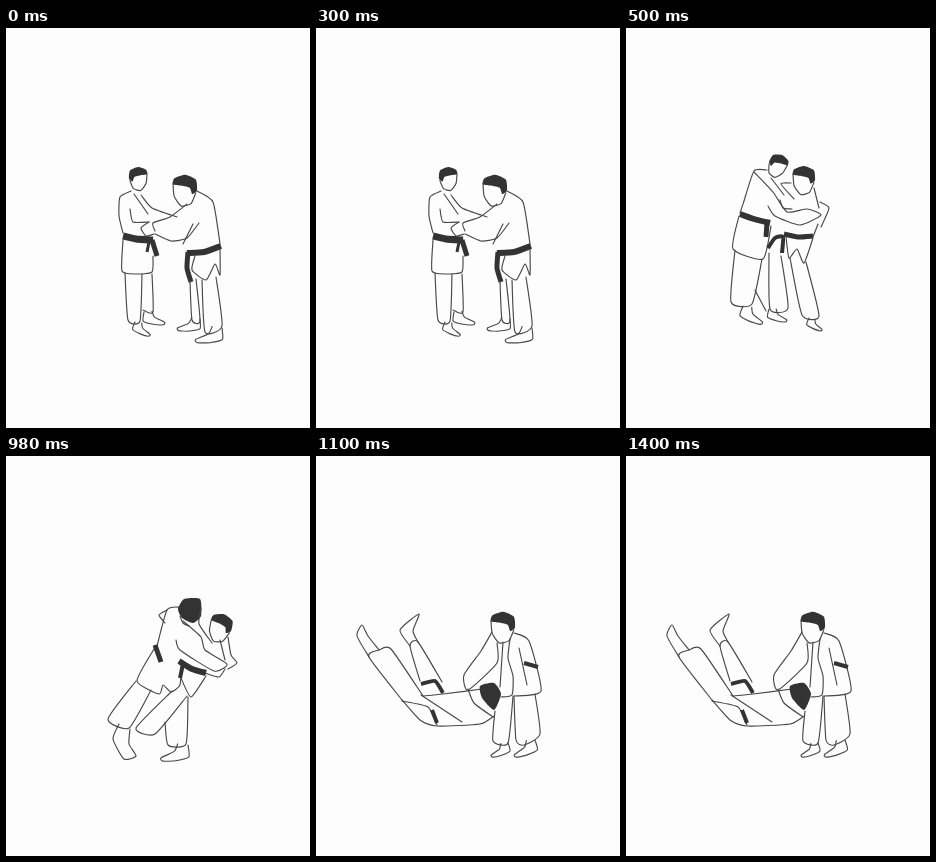
Animation of 304x400 px, one loop 1600 ms. Source, as an HTML page with a canvas:

```html
<!DOCTYPE html>
<html lang="en">
<head>
<meta charset="utf-8">
<title>Judo throw</title>
<style>
html, body { margin: 0; width: 100%; height: 100%; overflow: hidden; background: #fdfdfd; }
canvas { display: block; width: 100%; height: 100%; }
</style>
</head>
<body>
<canvas width="304" height="400"></canvas>
<script>
const ctx = document.querySelector('canvas').getContext('2d');
const INK = '#484848', DARK = '#333', LOOP = 1600;

// Slightly rounded path through the given x, y pairs.
function curve(p, closed) {
  const n = p.length / 2;
  const at = i => {
    const k = closed ? (i + n) % n : Math.max(0, Math.min(n - 1, i));
    return [p[2 * k], p[2 * k + 1]];
  };
  ctx.beginPath();
  ctx.moveTo(...at(0));
  for (let i = 0; i < (closed ? n : n - 1); i++) {
    const [a, b, c, d] = [at(i - 1), at(i), at(i + 1), at(i + 2)];
    ctx.bezierCurveTo(b[0] + (c[0] - a[0]) / 10, b[1] + (c[1] - a[1]) / 10,
      c[0] - (d[0] - b[0]) / 10, c[1] - (d[1] - b[1]) / 10, ...c);
  }
}

function stroke(color, width) {
  ctx.strokeStyle = color;
  ctx.lineWidth = width;
  ctx.stroke();
}

function line(...points) {
  curve(points);
  stroke(INK, 1.15);
}

function belt(width, ...points) {
  curve(points);
  ctx.lineCap = 'butt';
  stroke(DARK, width);
  ctx.lineCap = 'round';
}

function hair(...points) {
  curve(points, true);
  ctx.fillStyle = DARK;
  ctx.fill();
}

// Runs a drawing in its own scaled and turned space; a negative size faces left.
function place(x, y, size, tilt, drawing) {
  ctx.save();
  ctx.translate(x, y);
  ctx.rotate(tilt * Math.PI / 180);
  ctx.scale(size, Math.abs(size));
  drawing();
  ctx.restore();
  stroke(INK, 1.15);
}

function head(x, y, size, tilt = 0) {
  place(x, y, size, tilt, () => {
    hair(-1, .2, -.9, -.7, 0, -1.1, .9, -.8, 1, -.3, .3, -.2, -.4, 0, -.6, .5);
    curve([1, -.4, .9, .7, .3, 1.5, -.5, 1.3, -.9, .4]);
  });
}

function foot(x, y, size, tilt = 0) {
  place(x, y, size, tilt, () => curve([0, 0, -.08, .45, .4, .65, .9, .72, .98, .6, .5, .3, .4, 0]));
}

function grip() {
  head(132, 149, 9);
  line(125, 163, 114, 169, 113, 188, 117, 205);
  line(135, 167, 146, 180, 171, 189);
  line(128, 166, 142, 186);
  line(124, 181, 127, 194, 143, 194);
  belt(7, 117, 208, 130, 211, 147, 212);
  belt(5, 146, 212, 151, 228);
  belt(3, 143, 214, 141, 224);
  line(117, 212, 116, 243, 130, 246, 146, 244, 147, 228);
  line(119, 245, 122, 292, 134, 293, 136, 246);
  line(146, 246, 147, 284, 137, 282);
  foot(129, 294, 17, 8);
  foot(138, 284, 20, -5);

  head(179, 160, -12);
  line(191, 163, 207, 174, 214, 216);
  line(181, 176, 164, 189, 147, 195, 149, 203);
  line(143, 194, 135, 200, 140, 208, 148, 206);
  line(149, 206, 165, 213, 181, 210, 193, 195);
  line(187, 196, 177, 216);
  belt(6, 181, 225, 198, 224, 215, 218);
  belt(5, 182, 224, 181, 240, 185, 254);
  line(189, 228, 186, 242, 200, 252, 209, 236, 214, 247, 214, 221);
  line(184, 253, 186, 292, 194, 293, 190, 251);
  line(196, 252, 199, 304, 216, 298, 210, 249);
  foot(194, 291, -21, 10);
  foot(216, 300, -25, 8);
}

function closeIn() {
  head(152, 136, 9, 25);
  line(141, 142, 128, 143, 118, 173, 114, 185);
  line(128, 144, 147, 164, 161, 184, 181, 181, 195, 187, 174, 197, 149, 188, 142, 178);
  line(145, 150, 158, 167);
  belt(6, 114, 186, 128, 191, 144, 195);
  belt(5, 141, 195, 140, 209);
  line(113, 188, 107, 221, 137, 231, 145, 198);
  line(109, 222, 105, 274, 126, 276, 136, 231);
  line(129, 262, 140, 283);
  foot(117, 278, 22, 8);

  head(178, 150, -11);
  line(165, 155, 155, 156, 168, 171);
  line(154, 172, 157, 180, 166, 181);
  line(188, 160, 193, 180);
  line(194, 174, 203, 180, 195, 199);
  line(192, 196, 187, 209);
  belt(5, 158, 206, 172, 209, 187, 208);
  belt(4, 142, 220, 149, 210, 157, 209, 156, 225);
  line(160, 209, 163, 230, 171, 221, 178, 235, 187, 210);
  line(143, 225, 144, 281, 162, 280, 155, 228);
  line(164, 230, 176, 287, 193, 288, 180, 234);
  foot(143, 281, 18);
  foot(183, 290, 15, 10);
}

function load() {
  hair(172, 153, 178, 143, 194, 143, 195, 160, 187, 167, 176, 162);
  line(173, 151, 161, 154, 151, 190);
  line(161, 154, 153, 159, 159, 167);
  line(174, 160, 177, 167, 183, 170);
  line(177, 165, 195, 181, 199, 194, 221, 208, 208, 215, 174, 194, 170, 184);
  belt(5, 149, 189, 155, 206);
  line(148, 193, 131, 225, 153, 238, 157, 229, 165, 236, 174, 229, 175, 210);
  line(130, 225, 102, 263, 123, 272, 145, 234);
  line(113, 268, 107, 283, 118, 303, 130, 300, 123, 288, 124, 273);

  head(215, 170, -11, 15);
  line(195, 153, 193, 168, 206, 187);
  line(222, 181, 225, 199, 231, 207, 222, 213);
  line(214, 184, 219, 204);
  line(219, 213, 213, 221, 199, 217);
  belt(6, 173, 205, 186, 213, 200, 217);
  belt(4, 177, 208, 174, 222);
  line(175, 222, 185, 241, 200, 220);
  line(166, 235, 130, 272, 149, 278, 181, 240);
  line(159, 266, 162, 289, 180, 288, 182, 241);
  foot(182, 289, -26, 6);
}

function fall() {
  line(53, 201, 41, 180, 46, 169, 52, 180, 63, 194);
  line(86, 244, 53, 201, 63, 194, 75, 193, 107, 240);
  line(94, 190, 84, 174, 103, 158, 97, 175, 102, 186);
  line(104, 225, 94, 190, 102, 186, 126, 226);
  line(86, 244, 104, 264, 121, 270, 164, 268, 178, 260);
  line(107, 240, 127, 238, 166, 233);
  line(86, 245, 112, 251, 121, 269);
  line(105, 239, 146, 266);
  belt(4, 105, 228, 119, 225, 127, 237);
  belt(4, 116, 254, 121, 267);
  line(152, 233, 158, 247, 177, 261);
  hair(164, 230, 178, 227, 185, 238, 178, 254, 166, 242);

  head(187, 169, -12);
  line(198, 177, 213, 185, 225, 235, 198, 240);
  line(176, 176, 165, 195, 148, 219, 152, 234, 181, 207, 181, 187);
  line(187, 186, 184, 231);
  line(194, 183, 192, 202, 197, 220, 196, 239, 185, 241);
  line(203, 192, 211, 229);
  belt(4, 208, 207, 222, 211);
  line(179, 255, 177, 285, 192, 287, 197, 240);
  line(198, 240, 200, 284, 208, 289, 224, 278, 219, 238);
  foot(192, 287, -18, -4);
  foot(219, 284, -22, -4);
}

const poses = [[0, grip], [500, closeIn], [800, load], [1100, fall]];

function render() {
  const time = performance.now() % LOOP;
  const [, pose] = poses.findLast(([start]) => time >= start);
  ctx.fillStyle = '#fdfdfd';
  ctx.fillRect(0, 0, 304, 400);
  ctx.lineCap = ctx.lineJoin = 'round';
  pose();
  requestAnimationFrame(render);
}
render();
</script>
</body>
</html>
```
